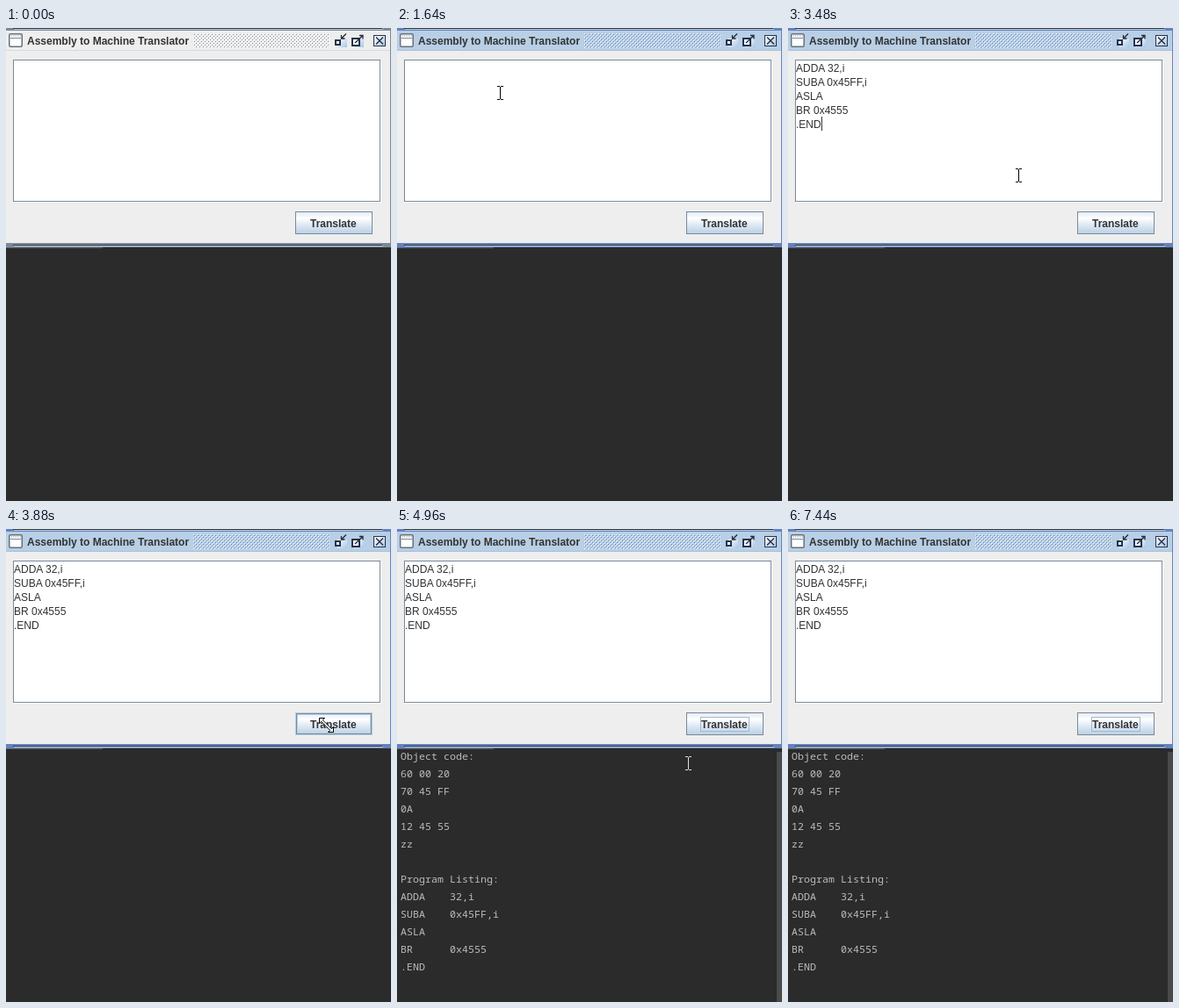
An HTML page for the animation above (8000 ms loop, 438 px wide and 539 px high).

```html
<!DOCTYPE html>
<html lang="en">
<head>
<meta charset="utf-8">
<title>Assembly to Machine Translator</title>
<style>
  html, body { margin: 0; width: 100%; height: 100%; overflow: hidden; background: #2b2b2b; }
  svg { display: block; shape-rendering: crispEdges; --edge: #7a8a99; --bar: #eee; --rule: #d8dbe0; }
  svg.active { --edge: #6382bf; --bar: #b8cfe5; --rule: #a9c0da; }
  text { white-space: pre; }
  .ui { font: 12px "Liberation Sans", Arial, sans-serif; fill: #333; }
  .bold { font-weight: bold; }
  .mono { font: 11.667px "Noto Sans Mono", monospace; fill: #bbb; }
  .edge { fill: var(--edge); }
  .line { fill: none; stroke: #7a8a99; }
  .smooth { shape-rendering: geometricPrecision; }
</style>
</head>
<body>
<svg id="stage" width="438" height="539" viewBox="0 0 438 539">
  <defs>
    <linearGradient id="steel" x2="0" y2="1">
      <stop stop-color="#dde8f3"/>
      <stop offset=".3" stop-color="#fff"/>
      <stop offset=".6" stop-color="#dde8f3"/>
      <stop offset="1" stop-color="#b8cfe5"/>
    </linearGradient>
    <linearGradient id="tint" x2="1" y2="1">
      <stop stop-color="#fff"/>
      <stop offset="1" stop-color="#a9c5e6"/>
    </linearGradient>
    <pattern id="bumps" x="213" y="6" width="4" height="4" patternUnits="userSpaceOnUse">
      <path fill="#fff" d="M0 0h1v1h-1zM2 2h1v1h-1z"/>
      <path class="edge" d="M1 1h1v1h-1zM3 3h1v1h-1z"/>
    </pattern>
  </defs>

  <rect width="438" height="539" fill="#2b2b2b"/>
  <rect y="250" width="110" height="1" fill="#5b5e61"/>

  <!-- window frame -->
  <rect class="edge" width="438" height="250"/>
  <path fill="#333" d="M8 0h420v1H8zM8 247h420v1H8z"/>
  <path fill="#b8cfe5" d="M9 1h420v1H9zM9 248h420v1H9z"/>
  <rect y="3" width="437" height="242" fill="#eee"/>

  <!-- title bar -->
  <rect y="3" width="437" height="22" fill="var(--bar)"/>
  <rect y="25" width="437" height="1" fill="var(--rule)"/>
  <rect x="213" y="6" width="155" height="17" fill="url(#bumps)"/>
  <text class="ui bold" x="24" y="19">Assembly to Machine Translator</text>
  <g class="smooth">
    <rect x="3.75" y="6.75" width="14.5" height="14.5" rx="1.5" fill="#fff" stroke="#66717c" stroke-width="1.5"/>
    <path d="M5 11.5h12" stroke="#7a8a99"/>
    <path d="M6 9h11" stroke="#7a8a99" stroke-dasharray="1 1"/>
  </g>
  <g>
    <rect x="377" y="12" width="11" height="10" fill="url(#tint)"/>
    <rect x="375" y="14" width="5" height="5" fill="#fff" stroke="#26334d" stroke-width="2"/>
    <rect x="396" y="12" width="11" height="10" fill="url(#tint)"/>
    <rect x="394" y="12" width="8" height="8" fill="#fff" stroke="#26334d" stroke-width="2"/>
    <rect x="418.5" y="8.5" width="13" height="12" fill="url(#tint)" stroke="#26334d"/>
    <g class="smooth" fill="none" stroke="#222c40" stroke-width="1.3">
      <path d="M387 6.5L382 11.5M381.5 8v4h4"/>
      <path d="M397 17L406 8.500M402 8.500h4v4"/>
      <path d="M421 10.500l8 8M429 10.500l-8 8"/>
    </g>
  </g>

  <!-- editor -->
  <rect x="9" y="37" width="418" height="162" fill="#fff"/>
  <rect class="line" x="8.5" y="36.5" width="417" height="161"/>
  <g id="source" class="ui"></g>
  <rect id="caret" width="1" height="16" fill="#333"/>

  <!-- button -->
  <rect id="face" x="329" y="209" width="88" height="26"/>
  <rect id="rim" class="line" x="329.5" y="209.5" width="87" height="25"/>
  <g id="glow" fill="none">
    <rect x="329.5" y="209.5" width="87" height="25" stroke="#b8cfe5"/>
    <rect x="331.5" y="211.5" width="83" height="21" stroke="#b8cfe5"/>
    <rect x="330.5" y="210.5" width="85" height="23" stroke="#7a8a99"/>
  </g>
  <rect id="focus" x="345.5" y="214.5" width="55" height="16" fill="none" stroke="#a3b8cc"/>
  <text class="ui bold" x="346" y="227">Translate</text>

  <!-- console -->
  <g id="object" class="mono"></g>
  <g id="listing" class="mono"></g>
  <rect id="scroll" x="432" y="254" width="6" height="285" fill="#4a4a4a"/>

  <g id="pointer">
    <path id="beam" d="M-3-8h3v1h1v-1h3v1h-3v14h3v1h-3v-1h-1v1h-3v-1h3v-14h-3z"/>
    <path id="resize" class="smooth" fill="#fff" stroke="#000"
          d="M-8-8H-2L-4.200-5.800 5.800 4.200 8 2V8H2L4.200 5.800-5.800-4.200-8-2Z"/>
  </g>
</svg>
<script>
const LOOP = 8000, STEP = 40;
const $ = id => document.getElementById(id);
const show = (id, on) => $(id).setAttribute('display', on ? 'inline' : 'none');

function addLines(id, x, y, gap, lines) {
  lines.forEach((line, i) => {
    const text = document.createElementNS('http://www.w3.org/2000/svg', 'text');
    text.setAttribute('x', x);
    text.setAttribute('y', y + i * gap);
    text.textContent = line;
    $(id).append(text);
  });
}

addLines('source', 9, 50, 16, ['ADDA 32,i', 'SUBA 0x45FF,i', 'ASLA', 'BR 0x4555', '.END']);
addLines('object', 4, 263, 20, ['Object code:', '60 00 20', '70 45 FF', '0A', '12 45 55', 'zz']);
addLines('listing', 4, 403, 20, ['Program Listing:', 'ADDA    32,i', 'SUBA    0x45FF,i',
  'ASLA', 'BR      0x4555', '.END']);

const ease = {
  in: p => p ** 1.5,
  out: p => 1 - (1 - p) ** 2,
  both: p => p * p * (3 - 2 * p),
  none: p => p
};

// time, x, y, easing used to reach the point
const path = [
  [520, 236, 540],
  [960, 172, 97, 'out'],
  [1240, 172, 97],
  [1640, 117, 74, 'in'],
  [2080, 92, 88, 'out'],
  [2960, 92, 88],
  [3480, 262, 168, 'in'],
  [3800, 359.5, 215.5, 'out'],
  [3960, 366.5, 225.5, 'out'],
  [4720, 366.5, 225.5],
  [5520, 203, 417, 'both'],
  [5560, 203, 417],
  [5720, 194, 421, 'out'],
  [7080, 194, 421],
  [7400, 312, 527, 'in']
];

function pointerAt(t) {
  const i = path.findIndex(p => p[0] >= t);
  if (i < 1) return path[i < 0 ? path.length - 1 : 0].slice(1, 3);
  const [t0, x0, y0] = path[i - 1], [t1, x1, y1, kind] = path[i];
  const p = ease[kind || 'none']((t - t0) / (t1 - t0));
  return [x0 + (x1 - x0) * p, y0 + (y1 - y0) * p];
}

const within = (t, ...spans) => spans.some(([a, b]) => t >= a && t < b);

function draw(t) {
  $('stage').classList.toggle('active', t >= 1080);

  const pasted = t >= 2240;
  show('source', pasted);
  show('caret', within(t, [1120, 1640], [2120, 2760], [3240, 3760]));
  $('caret').setAttribute('x', pasted ? 38 : 9);
  $('caret').setAttribute('y', pasted ? 101 : 37);

  const [x, y] = pointerAt(t);
  const visible = within(t, [560, 2240], [3000, 7440]);
  const onFrame = y > 198 && y < 250;
  const snap = onFrame ? v => Math.floor(v) + 0.5 : Math.round;
  show('pointer', visible);
  show('beam', !onFrame);
  show('resize', onFrame);
  $('pointer').setAttribute('transform', `translate(${snap(x)} ${snap(y)})`);
  $('beam').setAttribute('fill', y < 250 ? '#000' : '#e0e0e0');

  const hover = visible && x >= 329 && x < 417 && y >= 209 && y < 235;
  const pressed = within(t, [4280, 4320]);
  $('face').setAttribute('fill', pressed ? '#b8cfe5' : 'url(#steel)');
  show('glow', hover && !pressed);
  show('rim', !hover || pressed);
  show('focus', t >= 4280);

  show('object', t >= 4520);
  show('listing', t >= 4560);
  show('scroll', t >= 4560);
}

const start = performance.now();
function tick() {
  const t = (performance.now() - start) % LOOP;
  draw(Math.floor(t / STEP) * STEP);
  requestAnimationFrame(tick);
}
tick();
</script>
</body>
</html>
```
